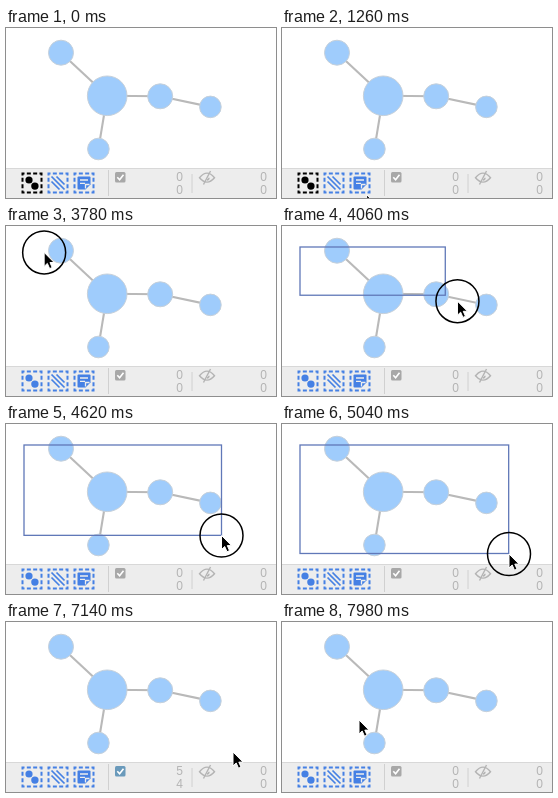
These frames come from a looping animation (270 by 170 pixels, 8000 ms). An HTML page:

```html
<!DOCTYPE html>
<html lang="en">
<head>
<meta charset="utf-8">
<title>Box selection in a network view</title>
<style>
  html, body { margin: 0; width: 100%; height: 100%; overflow: hidden; background: #fff; }
  svg { display: block; width: 270px; height: 170px; }
  text { font: 12px "Liberation Sans", Arial, sans-serif; fill: #b4b4b4; text-anchor: end; }
  .node { fill: #9fccfc; stroke: #c6d0da; }
  .edge { stroke: #b9b9b9; stroke-width: 2.1; }
  .selected .node { fill: #ff0; stroke: #eaea9c; stroke-width: 1.6; }
  .selected .edge { stroke: #c4505a; }
  .icon { color: #4580e4; }
  .icon.off { color: #000; }
  .frame { fill: none; stroke: currentColor; stroke-width: 2; stroke-dasharray: 4 2.33; stroke-dashoffset: 2; }
</style>
</head>
<body>
<svg viewBox="0 0 270 170">
  <defs>
    <rect id="frame" class="frame" x="-9" y="-9" width="19" height="19"/>
  </defs>
  <g id="graph"></g>

  <rect y="140" width="270" height="30" fill="#ededed"/>
  <path d="M0 140.5H270" stroke="#d8d8d8"/>
  <path d="M102.5 142V168M186 146V165" stroke="#d0d0d0"/>

  <g id="nodeIcon" class="icon" transform="translate(25.5 154.5)">
    <use href="#frame"/>
    <g fill="currentColor"><circle cx="-2.5" cy="-2.5" r="3.6"/><circle cx="3.4" cy="3.6" r="3.7"/></g>
  </g>
  <g class="icon" transform="translate(51.5 154.5)">
    <use href="#frame"/>
    <path d="M-6-6L7 7M-1-6L7 2M-6-1L2 7" stroke="currentColor" stroke-width="1.7"/>
  </g>
  <g class="icon" transform="translate(77.5 154.5)">
    <use href="#frame"/>
    <path d="M-5-6H6Q7-6 7-5V2L2 7H-5Q-6 7-6 6V-5Q-6-6-5-6Z" fill="currentColor"/>
    <path d="M-3.5-2.5H4.5M-3.5 .8H1.5M2 6V2H6" fill="none" stroke="#ededed" stroke-width="1.3"/>
  </g>

  <rect id="box" x="109" y="144" width="10.5" height="10.5" rx="1.5"/>
  <path d="M111.3 149.3L113.6 151.7L117.5 146.8" fill="none" stroke="#fff" stroke-width="1.6"/>
  <g fill="none" stroke="#b4b4b4" stroke-width="1.4">
    <path d="M193.5 149.7Q201 140.5 208.5 149.7Q201 158.5 193.5 149.7Z"/>
    <path d="M203 149.7A2.3 2.3 0 0 1 201 152"/>
    <path d="M204.5 143L197.5 156.5"/>
  </g>
  <text id="nodeCount" x="177" y="152.5"></text>
  <text id="edgeCount" x="177" y="166"></text>
  <text x="261" y="152.5">0</text>
  <text x="261" y="166">0</text>

  <rect id="band" x="18" y="21" fill="none" stroke="#6078b8" stroke-width="1.3"/>
  <g id="cursor">
    <circle id="press" r="21.5" fill="none" stroke="#000" stroke-width="1.5"/>
    <path d="M0 0V14L3.2 11L5.5 16.2L8 15.1L5.8 10.1H10Z" stroke="#fff" stroke-width="1"/>
  </g>
</svg>
<script>
const LOOP = 8000, STEP = 70;
const el = id => document.getElementById(id);

// Nodes are x, y, radius; edges join node indices.
const nodes = [[55, 24.7, 12.5], [101.2, 67.8, 19.8], [154.2, 68.3, 12.5], [204.4, 78.9, 10.8], [92.4, 121, 10.8]];
const edges = [[0, 1], [1, 2], [2, 3], [1, 4]];
el('graph').innerHTML =
  edges.map(([a, b]) => {
    const [x1, y1] = nodes[a], [x2, y2] = nodes[b];
    return `<path class="edge" d="M${x1} ${y1}L${x2} ${y2}"/>`;
  }).join('') +
  nodes.map(([x, y, r]) => `<circle class="node" cx="${x}" cy="${y}" r="${r}"/>`).join('');

const smooth = p => p * p * (3 - 2 * p);
const easeOut = n => p => 1 - (1 - p) ** n;

// The pointer rests between moves; the fast drag flattens out in x before y.
const origin = { x: 110, y: 174 };
const moves = [
  { start: 910, end: 1890, x: 23, y: 149 },
  { start: 2730, end: 3360, x: 18, y: 21 },
  { start: 3755, end: 4620, x: 215.5, y: 111.5, easeX: easeOut(3.67), easeY: easeOut(2.1) },
  { start: 4620, end: 5040, x: 227, y: 130 },
  { start: 7630, end: 7980, x: 77, y: 98 }
];

function pointer(t) {
  let { x, y } = origin;
  for (const { start, end, x: toX, y: toY, easeX = smooth, easeY = smooth } of moves) {
    const p = Math.min(1, Math.max(0, (t - start) / (end - start)));
    x += (toX - x) * easeX(p);
    y += (toY - y) * easeY(p);
  }
  return { x, y };
}

const within = (t, a, b) => t >= a && t < b;
const show = (id, on) => el(id).setAttribute('visibility', on ? 'visible' : 'hidden');

function draw(t) {
  const { x, y } = pointer(t);
  el('cursor').setAttribute('transform', `translate(${x} ${y})`);
  el('cursor').style.display = t < 980 ? 'none' : '';
  show('press', within(t, 1960, 2240) || within(t, 3640, 5250) || within(t, 7000, 7140));

  // The selection band trails the pointer slightly.
  const corner = pointer(t - 42);
  el('band').setAttribute('width', corner.x - 18);
  el('band').setAttribute('height', Math.max(0, corner.y - 21));
  show('band', within(t, 3780, 5250));

  el('graph').classList.toggle('selected', within(t, 5250, 7140));
  el('nodeIcon').classList.toggle('off', t < 2240);
  const counted = within(t, 5390, 7210);
  el('box').setAttribute('fill', counted ? '#6a9abb' : '#a8a8a8');
  el('nodeCount').textContent = counted ? nodes.length : 0;
  el('edgeCount').textContent = counted ? edges.length : 0;
}

function tick() {
  const t = performance.now() % LOOP;
  draw(Math.floor(t / STEP) * STEP);
  requestAnimationFrame(tick);
}
tick();
</script>
</body>
</html>
```
